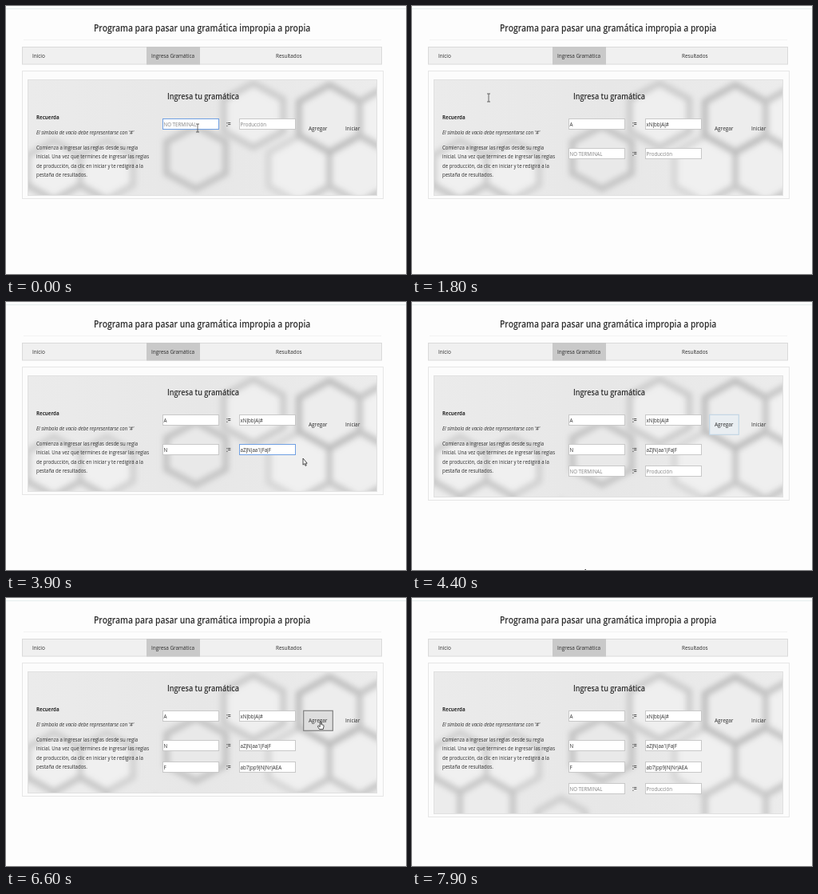
These frames come from a looping animation (501x336 px, 8 s). An HTML page:

```html
<!DOCTYPE html>
<html lang="es">
<head>
<meta charset="utf-8">
<title>Gramática</title>
<style>
html, body { margin: 0; width: 100%; height: 100%; overflow: hidden; background: #fdfdfd; }
svg { display: block; width: 501px; height: 336px; }
text { font-family: "Open Sans", "Noto Sans", sans-serif; fill: #2c2c2c; white-space: pre; }
.pipe { font-family: "Liberation Sans", Arial, sans-serif; }
</style>
</head>
<body>
<svg id="stage" viewBox="0 0 501 336">
  <defs>
    <filter id="soft" x="-20%" y="-20%" width="140%" height="140%"><feGaussianBlur stdDeviation="3.8"/></filter>
    <linearGradient id="tone">
      <stop offset="0" stop-color="#ebebeb"/><stop offset=".5" stop-color="#e7e7e7"/><stop offset="1" stop-color="#ececec"/>
    </linearGradient>
    <clipPath id="clip"><rect id="clipBox" x="27" y="92" width="438" height="146"/></clipPath>
  </defs>
  <rect width="501" height="336" fill="#fdfdfd"/>
  <path d="M0 3.5H501" stroke="#e6eeee"/>
  <path d="M22 42.5H470" stroke="#f2f2f2"/>
  <rect x="20.5" y="51.5" width="450" height="21.5" fill="#f0f0f0" stroke="#dadada"/>
  <rect x="176" y="51" width="67" height="22.5" fill="#c9c9c9"/>
  <rect id="card" x="20.5" y="81.5" width="452" height="160" fill="#fcfcfc" stroke="#e6e6e6"/>
  <g clip-path="url(#clip)">
    <rect x="27" y="92" width="438" height="190" fill="url(#tone)"/>
    <g id="hexes" filter="url(#soft)"></g>
  </g>
  <rect id="edge" x="27.5" y="92.5" width="437" height="145" fill="none" stroke="#e0e0e0"/>
  <g id="labels"></g>
  <rect id="button" x="372.7" y="141.3" width="36.6" height="25" stroke-width="1.2"/>
  <g id="actions"></g>
  <g id="rows"></g>
  <g id="pointer">
    <path id="beam" d="M-2 -5H2M0 -5V5M-2 5H2" fill="none" stroke="#555" stroke-width=".9"/>
    <path id="arrow" d="M0 0V8.2L1.8 6.6L3 9.4L4.3 8.8L3.1 6.2H5.2Z" fill="#fff" stroke="#222" stroke-width=".8"/>
    <path id="hand" d="M-.8 -5Q0 -6 .8 -5V-1.4L3.6 -.7Q4.2 -.4 4 1L3.2 4.6H-1.4L-3.6 1.2Q-3.6 0 -2.4 .4L-.8 1.6Z" fill="#fff" stroke="#222" stroke-width=".8"/>
  </g>
</svg>
<script>
const LOOP = 8000, STEP = 100, SQUEEZE = 0.85;
const NS = "http://www.w3.org/2000/svg";
const $ = id => document.getElementById(id);

function add(parent, tag, attrs = {}) {
  const el = document.createElementNS(NS, tag);
  for (const k in attrs) el.setAttribute(k, attrs[k]);
  parent.append(el);
  return el;
}
function setAll(el, attrs) {
  for (const k in attrs) el.setAttribute(k, attrs[k]);
}
// The whole page is shown slightly narrowed, so all text shares one scale.
function label(parent, x, y, size, str, extra = {}) {
  const el = add(parent, "text", { transform: `translate(${x} ${y}) scale(${SQUEEZE} 1)`, "font-size": size, ...extra });
  el.textContent = str;
  return el;
}

// Background honeycomb: centre x, centre y, half width, half height, line, fill
const cells = [
  [238, 190, 37, 39, "#c3c3c3", "#e9e9e9"],
  [310, 137, 37, 40, "#cbcbcb", "#efefef"],
  [367, 205, 38, 42, "#d6d6d6", "#f0f0f0"],
  [443, 205, 38, 42, "#c4c4c4", "#efefef"],
  [405, 268, 38, 42, "#c8c8c8", "#eeeeee"],
  [405, 141, 38, 42, "#bdbdbd", "#ededed"],
  [481, 141, 38, 42, "#c4c4c4", "#f1f1f1"],
  [60, 206, 33, 37, "#cecece", "#f0f0f0"],
  [126, 206, 33, 37, "#d0d0d0", "#f0f0f0"],
  [93, 262, 33, 37, "#c6c6c6", "#ececec"],
  [27, 262, 33, 37, "#c6c6c6", "#ececec"],
  [187, 284, 30, 33, "#cecece", "#eaeaea"]
];
for (const [x, y, w, h, stroke, fill] of cells) {
  const q = h / 2;
  add($("hexes"), "path", {
    d: `M${x} ${y - h}L${x + w} ${y - q}V${y + q}L${x} ${y + h}L${x - w} ${y + q}V${y - q}Z`,
    stroke, fill, "stroke-width": 8
  });
}

const L = $("labels");
label(L, 110, 32, 12.2, "Programa para pasar una gramática impropia a propia", { "font-weight": 600 });
label(L, 33, 65, 7.5, "Inicio");
label(L, 182, 65, 7.5, "Ingresa Gramática");
label(L, 338, 65, 7.5, "Resultados");
label(L, 202, 117, 10.7, "Ingresa tu gramática", { "font-weight": 600 });
label(L, 38, 142, 7.2, "Recuerda", { "font-weight": 700 });
label(L, 38, 161, 7.1, "El símbolo de vacío debe representarse con '#'", { "font-style": "italic" });
[
  "Comienza a ingresar las reglas desde su regla",
  "inicial. Una vez que termines de ingresar las reglas",
  "de producción, da clic en iniciar y te redigirá a la",
  "pestaña de resultados."
].forEach((s, i) => label(L, 38, 180 + i * 11.3, 7.1, s));
label($("actions"), 379, 156, 7.6, "Agregar");
label($("actions"), 425, 156, 7.6, "Iniciar");

// Each rule: when its row shows, focus times, typing times
const rules = [
  { y: 141, show: 0, head: "A", body: "xN|bb|A|#", focus: 0, named: 300, next: 400, from: 500, to: 1200, done: 1300 },
  { y: 178, show: 1600, head: "N", body: "aZ|N|aa1|Fa|F", focus: 3150, named: 3300, next: 3400, from: 3400, to: 3900, done: 4000 },
  { y: 205, show: 4200, head: "F", body: "ab7|pp9|N|Nr|AEA", focus: 5700, named: 5800, next: 5900, from: 5900, to: 6400, done: 6500 },
  { y: 232, show: 6700, head: "", body: "", focus: 9000, named: 9000, next: 9000, from: 9000, to: 9001, done: 9002 }
];
const bottoms = [238, 238, 245, 271];

function field(parent, x, y, hint) {
  const box = add(parent, "rect", { x: x + .5, y: y + .5, width: 70, height: 13, fill: "#fff" });
  const text = label(parent, x + 1.5, y + 9.8, 7.3, "");
  const caret = add(parent, "path", { d: `M${x + 1.5} ${y + 2}v10`, stroke: "#333", "stroke-width": .8 });
  let last = null;
  return (value, focused, blink) => {
    setAll(box, { stroke: focused ? "#6f9fe2" : "#c8c8c8" });
    caret.style.display = focused && blink && !value ? "" : "none";
    if (value === last) return;
    last = value;
    text.style.fill = value ? "#2c2c2c" : "#808080";
    text.textContent = "";
    for (const part of (value || hint).split(/(\|)/)) {
      if (part) add(text, "tspan", part === "|" ? { class: "pipe" } : {}).textContent = part;
    }
  };
}
for (const r of rules) {
  r.group = add($("rows"), "g");
  r.setHead = field(r.group, 196, r.y, "NO TERMINAL");
  label(r.group, 276, r.y + 9.8, 8, ":=", { "font-weight": 600 });
  r.setBody = field(r.group, 292, r.y, "Producción");
}

// Pointer path: time, x, y, shape from that time on
const path = [
  [0, 240, 153, "beam"], [200, 240, 153, "beam"], [400, 300, 38, "arrow"], [500, 300, 38, "arrow"],
  [800, 142, 190, "arrow"], [1000, 217, 328, "arrow"], [1300, 394, 160, "hand"], [1600, 394, 160, "hand"],
  [1700, 250, 140, "arrow"], [1800, 96, 115, "beam"], [2400, 62, 107, "beam"], [2500, 63, 109, "beam"],
  [2600, 62, 108, "beam"], [2800, 62, 108, "beam"], [2900, 62, 107, "beam"], [3000, 62, 107, "beam"],
  [3100, 250, 189, "beam"], [3200, 248, 191, "beam"], [3400, 320, 195, "beam"], [3900, 372, 196, "arrow"],
  [4000, 394, 160, "hand"], [4200, 394, 160, "hand"], [4400, 217, 335, "arrow"], [4800, 228, 38, "arrow"],
  [4900, 228, 38, "arrow"], [5200, 62, 113, "beam"], [5300, 62, 113, "beam"], [5400, 62, 112, "beam"],
  [5500, 62, 112, "beam"], [5600, 157, 217, "arrow"], [5700, 240, 213, "beam"], [5900, 325, 221, "beam"],
  [6400, 350, 221, "beam"], [6500, 394, 160, "hand"], [6900, 394, 160, "hand"], [7000, 394, 172, "arrow"],
  [7200, 200, 38, "arrow"], [7500, 62, 124, "beam"], [7800, 61, 124, "beam"], [7900, 61, 124, "none"], [8000, 61, 124, "none"]
];
const shapes = ["beam", "arrow", "hand"];

function movePointer(t) {
  let i = 0;
  while (i < path.length - 2 && path[i + 1][0] <= t) i++;
  const [t0, x0, y0, kind] = path[i], [t1, x1, y1] = path[i + 1];
  const k = (t - t0) / (t1 - t0);
  setAll($("pointer"), { transform: `translate(${x0 + (x1 - x0) * k} ${y0 + (y1 - y0) * k})` });
  for (const s of shapes) $(s).style.display = s === kind ? "" : "none";
}

function drawButton(t) {
  const inside = (a, b) => t >= a && t < b;
  const hot = inside(1300, 1700) || inside(4000, 4300) || inside(6500, 7000);
  const focused = inside(4300, 4800);
  setAll($("button"), {
    fill: hot ? "#dedede" : focused ? "#e9eef2" : "none",
    stroke: hot ? "#808080" : focused ? "#c3d5e4" : "none"
  });
}

function draw(t) {
  const count = rules.filter(r => t >= r.show).length;
  const bottom = bottoms[count - 1];
  setAll($("clipBox"), { height: bottom - 92 });
  setAll($("edge"), { height: bottom - 93 });
  setAll($("card"), { height: bottom - 78 });
  for (const r of rules) {
    r.group.style.display = t >= r.show ? "" : "none";
    const k = Math.min(1, Math.max(0, (t - r.from) / (r.to - r.from)));
    const blink = (t - r.focus + 900) % 1000 < 500;
    r.setHead(t >= r.named ? r.head : "", t >= r.focus && t < r.next, blink);
    r.setBody(r.body.slice(0, Math.round(k * r.body.length)), t >= r.next && t < r.done, blink);
  }
  drawButton(t);
  movePointer(t);
}

const start = performance.now();
function tick() {
  const t = (performance.now() - start) % LOOP;
  draw(Math.floor(t / STEP) * STEP);
  requestAnimationFrame(tick);
}
tick();
</script>
</body>
</html>
```
